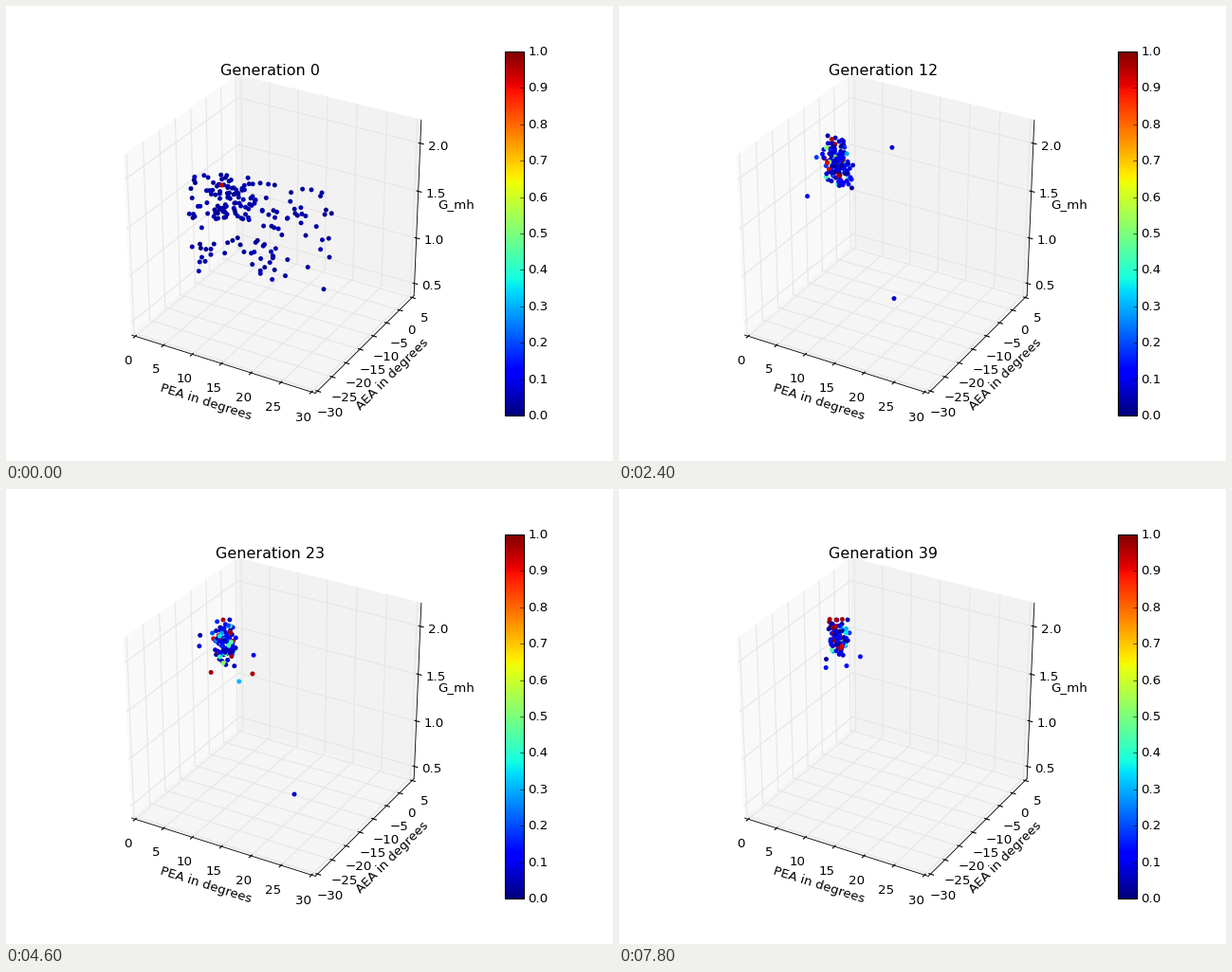
Animation, 640 px wide and 480 px high, one loop 8 s. Source, as a matplotlib script:

```python
import numpy as np
import matplotlib.pyplot as plt
from matplotlib.animation import FuncAnimation

plt.rcParams["font.family"] = "DejaVu Sans"
W, H, DPI = 640, 480, 80
GENS = 40
HI = 0.5 + 1 / 48          # panes reach slightly past the data cube
LO = -HI

fig = plt.figure(figsize=(W / DPI, H / DPI), dpi=DPI, facecolor="white")
ax = fig.add_axes([0, 0, 1, 1])
ax.axis("off")


def project(p):
    """Perspective view (elev 30, azim -60) of the centred unit cube, in pixels."""
    p = np.asarray(p, float)
    c, s = np.sqrt(0.75), 0.5
    depth = 10 - p @ [c * s, -c * c, s]
    u = p @ [c, s, 0] / depth
    v = p @ [-s * s, s * c, c] / depth
    return np.array([80 + 396.8 * (u + 0.095) / 0.185,
                     48 + 384 * (0.09 - v) / 0.185])


def line(a, b, color, width, z):
    (x0, y0), (x1, y1) = project(a), project(b)
    ax.plot([x0, x1], [y0, y1], color=color, lw=width, zorder=z)


def label(x, y, s, size=12, **kw):
    return ax.text(x, y, s, size=size, color="black", zorder=6, **kw)


def draw_pane(axis, side, gray):
    corners = [(LO, LO), (LO, HI), (HI, HI), (HI, LO)]
    pts = [project(np.insert(c, axis, side)) for c in corners]
    ax.add_patch(plt.Polygon(pts, fc=str(gray), ec=str(gray), lw=1, zorder=1))


def draw_axis(axis, edge, out, tick_axis, span, values, gap, name, angle):
    """One labelled axis; edge fixes the other coordinates, out points away."""
    edge, out = np.array(edge), np.array(out)
    back = np.array([LO, HI, LO])       # where the three panes meet
    tick = np.eye(3)[tick_axis] * out / 12

    def at(base, t):
        p = np.array(base, float)
        p[axis] = t
        return p

    line(at(edge, LO), at(edge, HI), "black", 0.75, 3)
    for val in values:
        t = (val - span[0]) / (span[1] - span[0]) - 0.5
        corner = at(back, t)
        for k in {0, 1, 2} - {axis}:
            far = corner.copy()
            far[k] = -far[k]
            line(corner, far, "0.9", 1, 2)
        p = at(edge, t)
        line(p - 0.1 * tick, p + 0.2 * tick, "black", 1, 4)
        x, y = project(p + out * gap / 12)
        label(x, y + 9.2, str(val).replace("-", "\u2212"),
              ha="center", va="baseline")
    x, y = project(at(edge, 0) + out * 1.75 / 12)
    label(x, y, name, rotation=angle, ha="center", va="center")


def draw_colorbar():
    x0, x1, y0, y1 = 526, 546, 48, 432
    ax.imshow(np.linspace(1, 0, 256)[:, None], cmap="jet", aspect="auto",
              extent=(x0, x1, y1, y0), interpolation="nearest", zorder=2)
    ax.add_patch(plt.Rectangle((x0, y0), x1 - x0, y1 - y0, fill=False,
                               ec="black", lw=1, zorder=4))
    for i in range(11):
        y = y1 - (y1 - y0) * i / 10
        ax.plot([x1 - 4.4, x1], [y, y], color="black", lw=0.5, zorder=4)
        label(550.4, y + 4, f"{i / 10:.1f}", ha="left", va="baseline")


# How the swarm tightens and climbs, at a few generations
KEYS = [0, 5, 16, 39]
SWARM = dict(
    x=[238, 228, 231, 231], y=[203, 168, 164, 157],
    sx=[19, 9, 6.5, 5], sy=[14, 18, 13, 10],
    count=[70, 125, 115, 85],
    top=[0, 0.13, 0.07, 0.16], mid=[0, 0.12, 0.13, 0.16],
    low=[0.05, 0.12, 0.14, 0.14],
    strays=[0, 14, 7, 7], reach=[20, 30, 18, 18],
    best_x=[227, 216, 229, 229], best_y=[189, 145, 138, 138],
)


def fitness(rng, n, s):
    kind, r = rng.random((2, n))
    low = 0.02 + (s["low"] - 0.02) * r
    return np.where(kind < s["top"], 0.92 + 0.08 * r,
                    np.where(kind < s["top"] + s["mid"], 0.15 + 0.4 * r ** 2, low))


def population(gen):
    """Screen x, y and fitness of every individual."""
    rng = np.random.default_rng(500 + gen)
    s = {k: np.interp(gen, KEYS, v) for k, v in SWARM.items()}

    # first random spread, dying out quickly
    n = int(110 * np.exp(-0.7 * gen))
    x = 192 + 155 * rng.beta(1.1, 1.4, n)
    y = 185 + 108 * rng.beta(1.1, 1.3, n) + 0.12 * (x - 270)
    parts = [(x, y, 0.01 + 0.04 * rng.random(n))]

    # loose strays, mostly below and to the right
    n = int(s["strays"])
    x = s["x"] + s["reach"] * (0.4 + rng.normal(size=n))
    y = s["y"] + 14 + 22 * rng.normal(size=n).clip(-1.5, 2)
    parts.append((x, y, fitness(rng, n, s)))
    if 8 <= gen <= 30:
        parts.append((np.interp(gen, [9, 16, 23, 30], [281, 302, 304, 281]),
                      np.interp(gen, [9, 16, 23, 30], [303, 316, 322, 255]),
                      0.06))

    # dense swarm, with its far tails pulled in
    n = int(s["count"])
    gx, gy = rng.normal(size=(2, n))
    gx, gy = (np.where(np.abs(g) > 2, g / 2, g) for g in (gx, gy))
    parts.append((s["x"] + s["sx"] * gx + 0.15 * s["sy"] * gy,
                  s["y"] + s["sy"] * gy, fitness(rng, n, s)))
    parts.append((s["best_x"], s["best_y"], 0.95))
    return np.hstack([np.reshape(p, (3, -1)) for p in parts]).T


draw_pane(0, LO, 0.975)
draw_pane(1, HI, 0.95)
draw_pane(2, LO, 0.9625)
draw_axis(0, (0, LO, LO), (0, -1, -1), 1, (0, 30), range(0, 31, 5),
          0.9, "PEA in degrees", -17.6)
draw_axis(1, (HI, 0, LO), (1, 0, -1), 0, (-30, 5), range(-30, 6, 5),
          0.86, "AEA in degrees", 44.7)
draw_axis(2, (HI, HI, 0), (1, 1, 0), 0, (0.4, 2.2), (0.5, 1.0, 1.5, 2.0),
          0.8, "G_mh", 0)
draw_colorbar()
title = label(278.4, 73.2, "", size=14.4, ha="center", va="baseline")
dots = ax.scatter([], [], s=20, c=[], cmap="jet", vmin=0, vmax=1,
                  linewidths=0, zorder=5)
ax.set(xlim=(0, W), ylim=(H, 0))


def update(gen):
    pop = population(gen)
    dots.set_offsets(pop[:, :2])
    dots.set_array(pop[:, 2])
    title.set_text(f"Generation {gen}")
    return dots, title


anim = FuncAnimation(fig, update, frames=GENS, interval=200, repeat=True,
                     repeat_delay=0, blit=False)
plt.show()
```
